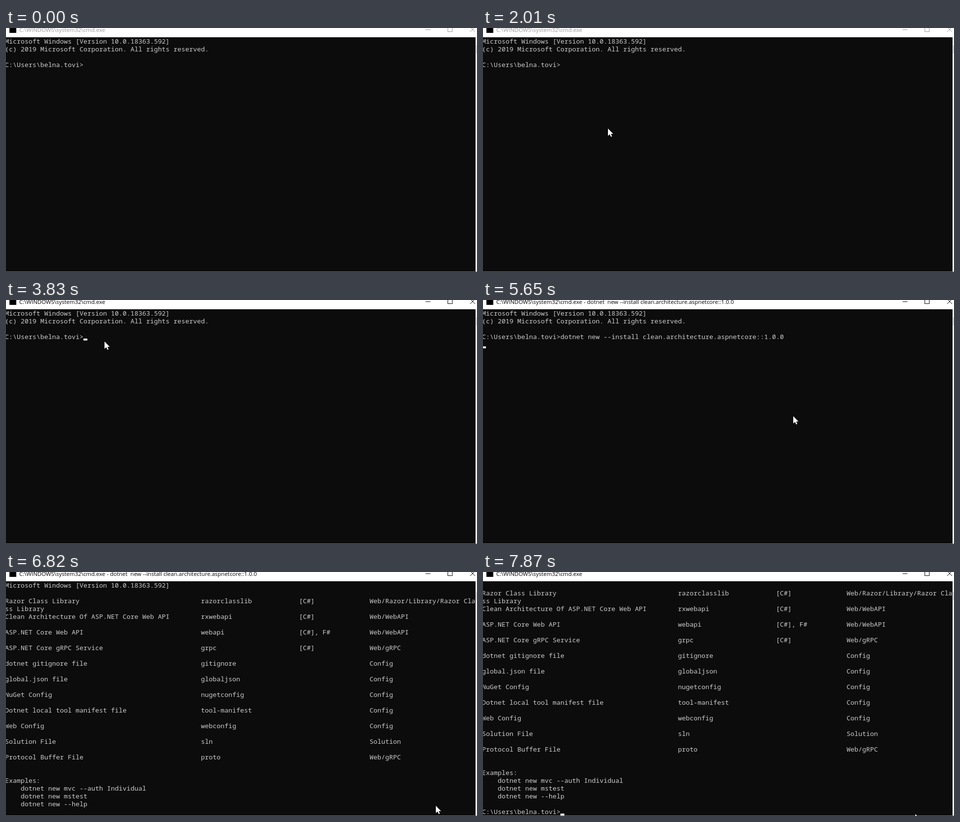
These frames come from a looping animation (961 px wide and 500 px high, 8000 ms). An HTML page with a canvas:

```html
<!DOCTYPE html>
<html lang="en">
<head>
<meta charset="utf-8">
<title>Command prompt</title>
<style>
html, body { margin: 0; width: 100%; height: 100%; overflow: hidden; background: #0c0c0c; }
canvas { display: block; }
</style>
</head>
<body>
<canvas id="stage" width="961" height="500"></canvas>
<script>
const ctx = document.getElementById('stage').getContext('2d');
const W = 961, H = 500, LOOP = 8000;
const CELL = 8, LINE = 16, LEFT = -2, BASE = 32;
const MONO = '13.3333px "Noto Sans Mono", "DejaVu Sans Mono", monospace';
const UI = '11.5px "Open Sans", "Noto Sans", sans-serif';

const FOCUS = 3520, CARET = 3830, PASTE = 4560, ENTER = 4980, LIST = 6770, DONE = 6910;
const PROMPT = 'C:\\Users\\belna.tovi>';
const SHELL = 'C:\\WINDOWS\\system32\\cmd.exe';
const ARGS = '--install clean.architecture.aspnetcore::1.0.0';
const COMMAND = 'dotnet new ' + ARGS;

// name | short name | language | tags
const TEMPLATES = `Clean Architecture Of ASP.NET Core Web API|rxwebapi|[C#]|Web/WebAPI
ASP.NET Core Web API|webapi|[C#], F#|Web/WebAPI
ASP.NET Core gRPC Service|grpc|[C#]|Web/gRPC
dotnet gitignore file|gitignore||Config
global.json file|globaljson||Config
NuGet Config|nugetconfig||Config
Dotnet local tool manifest file|tool-manifest||Config
Web Config|webconfig||Config
Solution File|sln||Solution
Protocol Buffer File|proto||Web/gRPC`.split('\n');
const WIDTHS = [50, 25, 18, 0];

function rect(x, y, w, h, color) {
  ctx.fillStyle = color;
  ctx.fillRect(x, y, w, h);
}

function put(text, row) {
  ctx.font = MONO;
  ctx.fillStyle = '#cccccc';
  ctx.fillText(text, LEFT, BASE + row * LINE);
}

function caret(row, col) {
  rect(LEFT + col * CELL, BASE + row * LINE - 1, CELL, 4, '#f2f2f2');
}

function putRow(entry, row) {
  put(entry.split('|').map((cell, i) => cell.padEnd(WIDTHS[i])).join(''), row);
}

function drawTable(top) {
  putRow('Razor Class Library|razorclasslib|[C#]|Web/Razor/Library/Razor Cla', top);
  put('ss Library', top + 1);
  TEMPLATES.forEach((entry, i) => putRow(entry, top + 2 + i * 2));
  put('Examples:', top + 23);
  ['mvc --auth Individual', 'mstest', '--help'].forEach((arg, i) =>
    put('    dotnet new ' + arg, top + 24 + i));
}

function drawConsole(t) {
  if (t >= DONE) {
    drawTable(1);
    put(PROMPT, 29);
    caret(29, PROMPT.length);
    return;
  }
  put('Microsoft Windows [Version 10.0.18363.592]', 0);
  if (t >= LIST) {
    drawTable(2);
    return;
  }
  put('(c) 2019 Microsoft Corporation. All rights reserved.', 1);
  const line = PROMPT + (t >= PASTE ? COMMAND : '');
  put(line, 3);
  if (t >= ENTER) caret(4, 0);
  else if (t >= CARET) caret(3, line.length);
}

function drawFrame(t) {
  const ink = t >= FOCUS ? '#000000' : '#999999';
  const busy = t >= ENTER && t < DONE;
  rect(0, 0, W, 19, '#ffffff');
  rect(7, 0, 14, 10, '#000000');
  ctx.font = UI;
  ctx.fillStyle = ink;
  ctx.fillText(SHELL + (busy ? ' - dotnet  new ' + ARGS : ''), 27, 8);

  rect(856, 3, 10, 1, ink);
  ctx.strokeStyle = ink;
  ctx.lineWidth = 1;
  ctx.strokeRect(901.5, -2.5, 9, 10);
  ctx.beginPath();
  for (const side of [-1, 1]) {
    ctx.moveTo(952 - side * 5, -2);
    ctx.lineTo(952 + side * 5, 8);
  }
  ctx.stroke();

  rect(958, 19, 3, H - 19, '#f0f0f0');
  rect(959, t >= LIST ? 41 : 36, 2, 16, '#cdcdcd');
  rect(0, H - 1, W, 1, '#777777');
}

// The pointer rests at each place and then glides on in short ticks.
const TICK = 80;
const glide = (start, end, x, y) => ({ start, end, x, y });
const GLIDES = [
  glide(400, 600, 750, 406),
  glide(1080, 1360, 625, 350),
  glide(1440, 1810, 293, 272),
  glide(1890, 2010, 255, 206),
  glide(2340, 2670, 215, 101),
  glide(2910, 2910, 206, 97),
  glide(2990, 2990, 187, 78),
  glide(3240, FOCUS, 201, 85),
  glide(5650, 5650, 633, 238),
  glide(5700, 5700, 661, 283),
  glide(5920, 6380, 905, 484),
  glide(6450, 6680, 877, 479),
  glide(7450, 7870, 882, 496)
];

function pointerAt(t) {
  let x = 862, y = 512;
  for (const to of GLIDES) {
    if (t < to.start) break;
    const span = to.end - to.start;
    const steps = Math.round(span / TICK) + 1;
    const done = span ? Math.floor((t - to.start) / span * (steps - 1)) + 1 : 1;
    const part = Math.min(1, done / steps);
    x += (to.x - x) * part;
    y += (to.y - y) * part;
  }
  return [Math.round(x), Math.round(y)];
}

const ARROW = new Path2D('M0 0V15L3.5 11.7L6 17L8.3 16L5.9 10.9H10.7Z');

function drawPointer(t) {
  ctx.save();
  ctx.translate(...pointerAt(t));
  ctx.strokeStyle = '#000000';
  ctx.lineWidth = 1;
  ctx.stroke(ARROW);
  ctx.fillStyle = '#ffffff';
  ctx.fill(ARROW);
  ctx.restore();
}

function draw(t) {
  rect(0, 0, W, H, '#0c0c0c');
  drawConsole(t);
  drawFrame(t);
  drawPointer(t);
}

const begin = performance.now();
function tick(now) {
  draw(Math.max(0, now - begin) % LOOP);
  requestAnimationFrame(tick);
}
draw(0);
requestAnimationFrame(tick);
</script>
</body>
</html>
```
